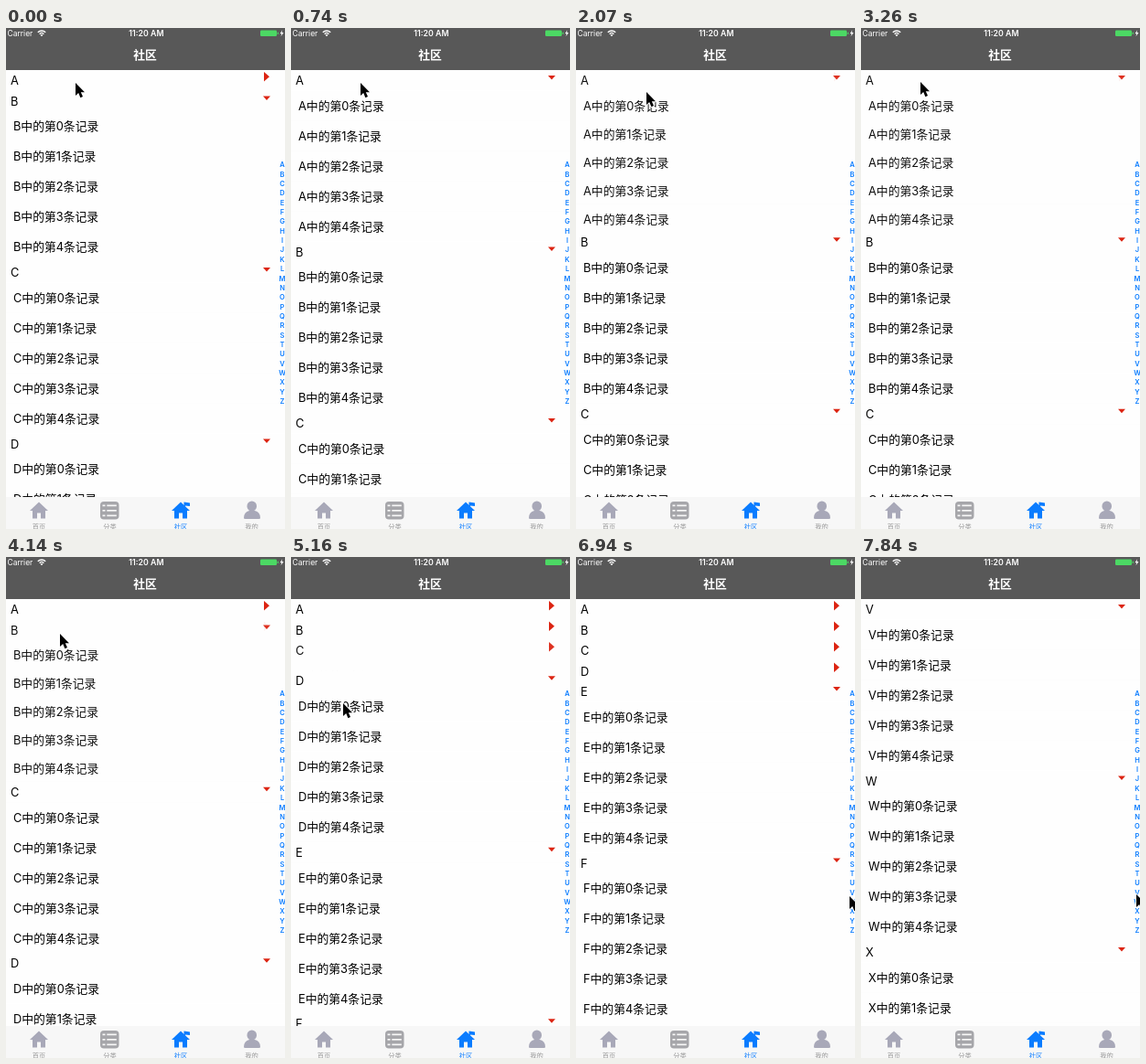
Write an HTML page with a canvas that moves like this. It is 305x548 px and loops after 8000 ms.

```html
<!DOCTYPE html>
<html lang="zh">
<head>
<meta charset="utf-8">
<style>
  html, body { margin: 0; width: 100%; height: 100%; overflow: hidden; background: #fefefe; }
  canvas { display: block; width: 305px; height: 548px; }
</style>
</head>
<body>
<canvas></canvas>
<script>
const WIDTH = 305, HEIGHT = 548, LOOP = 8000;
const STEP = 147.5;
const LIST_TOP = 46, LIST_BOTTOM = 513;
const HEADER = 22.5, ROW = 33, ROWS = 5;
const TOGGLE_TIME = 300, JUMP_TIME = 7840;
const FONT = 'Inter, "Noto Sans CJK SC", "Noto Sans CJK", sans-serif';
const LIST_SIZE = 12.8;
const LETTERS = [...'ABCDEFGHIJKLMNOPQRSTUVWXYZ'];
const PAPER = '#fefefe', BAR = '#f7f7f7', BLUE = '#0a7cff', GREY = '#a8a8b8', RED = '#dc2412';

// Times at which each section starts to open or close
const toggles = { A: [340, 1077, 1813, 3197], B: [4082], C: [4912], D: [5895] };

// Pointer path: step, x, y
const pointerPath = [
  [0, 76, 60], [13, 76, 60], [14, 77, 70], [16, 80, 100], [18, 72, 76], [20, 66, 59],
  [24, 64, 59], [27, 59, 84], [31, 59, 84], [33, 58, 101], [35, 57, 160],
  [37, 59, 160], [39, 64, 127], [40, 64, 127], [41, 96, 147], [47, 299, 371],
  [48, 299, 371], [50, 301, 369], [55, 301, 369]
];

const canvas = document.querySelector('canvas');
const ctx = canvas.getContext('2d');
const ratio = window.devicePixelRatio || 1;
canvas.width = WIDTH * ratio;
canvas.height = HEIGHT * ratio;

const clamp = v => Math.max(0, Math.min(1, v));
const mix = (a, b, p) => a + (b - a) * p;
const ease = p => (1 - Math.cos(Math.PI * clamp(p))) / 2;

function text(string, x, y, size, color = '#000', weight = 400, align = 'left') {
  ctx.font = `${weight} ${size}px ${FONT}`;
  ctx.fillStyle = color;
  ctx.textAlign = align;
  ctx.fillText(string, x, y);
}

function rect(x, y, w, h, color, radius = 0) {
  ctx.fillStyle = color;
  ctx.beginPath();
  ctx.roundRect(x, y, w, h, radius);
  ctx.fill();
}

function shape(path, x, y, color) {
  ctx.save();
  ctx.translate(x, y);
  ctx.fillStyle = color;
  ctx.fill(new Path2D(path));
  ctx.restore();
}

function clipped(x, y, w, h, draw) {
  ctx.save();
  ctx.beginPath();
  ctx.rect(x, y, w, h);
  ctx.clip();
  draw();
  ctx.restore();
}

function openness(letter, time) {
  let open = letter === 'A' ? 0 : 1;
  for (const start of toggles[letter] || [])
    open = mix(open, 1 - open, ease((time - start) / TOGGLE_TIME));
  return open;
}

function drawSection(letter, top, open) {
  ctx.globalAlpha = 1 - open * (1 - open);
  text(letter, 5, top + 16, LIST_SIZE);
  ctx.globalAlpha = open;
  shape('M-4 0H4L0 4.5Z', 285, top + 6, RED);
  ctx.globalAlpha = 1 - open;
  shape('M0 0L6 5.2L0 10.5Z', 282, top + 2, RED);
  ctx.globalAlpha = open;
  const rowsTop = top + HEADER;
  // Rows keep their height while closing, so each one veils the row above
  clipped(0, rowsTop, WIDTH, ROW * ROWS * open, () => {
    for (let i = 0; i < ROWS; i++) {
      const y = rowsTop + i * ROW * open;
      rect(0, y, WIDTH, ROW, PAPER);
      text(`${letter}中的第${i}条记录`, 8, y + 21.3, LIST_SIZE);
    }
  });
  ctx.globalAlpha = 1;
}

function drawList(time, jumped) {
  const sections = LETTERS.map(letter => ({ letter, open: openness(letter, time) }));
  let y = 0;
  for (const s of sections) {
    s.top = y;
    y += HEADER + ROW * ROWS * s.open;
  }
  const scroll = jumped ? sections.find(s => s.letter === 'V').top : 0;
  clipped(0, LIST_TOP, WIDTH, LIST_BOTTOM - LIST_TOP, () => {
    for (const s of sections) {
      const top = LIST_TOP + s.top - scroll;
      if (top > -HEIGHT && top < LIST_BOTTOM) drawSection(s.letter, top, s.open);
    }
  });
  LETTERS.forEach((letter, i) => text(letter, 302, 152.2 + i * 10.36, 7.5, BLUE, 600, 'center'));
}

function drawTopBar() {
  rect(0, 0, WIDTH, LIST_TOP, '#585858');
  text('Carrier', 1.5, 9, 8.5, '#fff');
  ctx.strokeStyle = '#fff';
  ctx.lineWidth = 1.3;
  for (const r of [3.4, 6]) {
    ctx.beginPath();
    ctx.arc(39, 9, r, -Math.PI * 0.75, -Math.PI * 0.25);
    ctx.stroke();
  }
  shape('M0 0L-1.6 -1.8Q0 -2.8 1.6 -1.8Z', 39, 9.3, '#fff');
  text('11:20 AM', 153.5, 9, 8.8, '#fff', 600, 'center');
  rect(278, 2.5, 18, 6.5, '#4cd964', 1.2);
  rect(296.6, 4.5, 1.2, 2.6, '#4cd964', 0.5);
  shape('M2.6 0L0 4H1.8L1 7L4 2.8H2.1Z', 299.5, 2.3, '#fff');
  text('社区', 152, 33.8, 12.8, '#fff', 700, 'center');
}

function drawHome(x, color, flag) {
  shape('M10 0L20 9.5H17V18H12V12H8V18H3V9.5H0Z', x, 518.5, color);
  if (flag) shape('M13.5 0L20 1V4.5L15 4V6H13.5Z', x, 518.5, color);
}

function drawTabBar() {
  rect(0, LIST_BOTTOM, WIDTH, HEIGHT - LIST_BOTTOM, BAR);
  drawHome(26, GREY);
  rect(103, 518, 20.5, 19.5, '#a6a6aa', 4);
  for (const y of [521.5, 527, 532.5]) {
    rect(105.5, y, 3, 1.7, BAR);
    rect(110.3, y, 10.5, 1.7, BAR);
  }
  drawHome(181, BLUE, true);
  rect(263.5, 517.5, 10.5, 11, GREY, 5.2);
  shape('M0 8Q0 1.5 6 0H12Q18 1.5 18 8Q18 9 16.5 9H1.5Q0 9 0 8Z', 260, 528, GREY);
  ['首页', '分类', '社区', '我的'].forEach((label, i) =>
    text(label, 36 + i * 77.5, 547.8, 7.3, i === 2 ? BLUE : '#999', 400, 'center'));
}

function drawPointer(step) {
  const next = Math.max(1, pointerPath.findIndex(p => p[0] >= step));
  const [k0, x0, y0] = pointerPath[next - 1], [k1, x1, y1] = pointerPath[next];
  const p = (step - k0) / (k1 - k0);
  const arrow = new Path2D('M0 0V14L3.2 11L5.4 16.2L8 15.1L5.8 10.2H10Z');
  ctx.save();
  ctx.translate(mix(x0, x1, p), mix(y0, y1, p));
  ctx.strokeStyle = '#fff';
  ctx.lineWidth = 2;
  ctx.lineJoin = 'round';
  ctx.stroke(arrow);
  ctx.fillStyle = '#000';
  ctx.fill(arrow);
  ctx.restore();
}

function render(time) {
  const step = Math.floor((time + 8) / STEP);
  ctx.setTransform(ratio, 0, 0, ratio, 0, 0);
  rect(0, 0, WIDTH, HEIGHT, PAPER);
  drawList(step * STEP, time >= JUMP_TIME);
  drawTopBar();
  drawTabBar();
  drawPointer(step);
}

const startTime = performance.now();
function tick() {
  render((performance.now() - startTime) % LOOP);
  requestAnimationFrame(tick);
}
tick();
</script>
</body>
</html>
```
